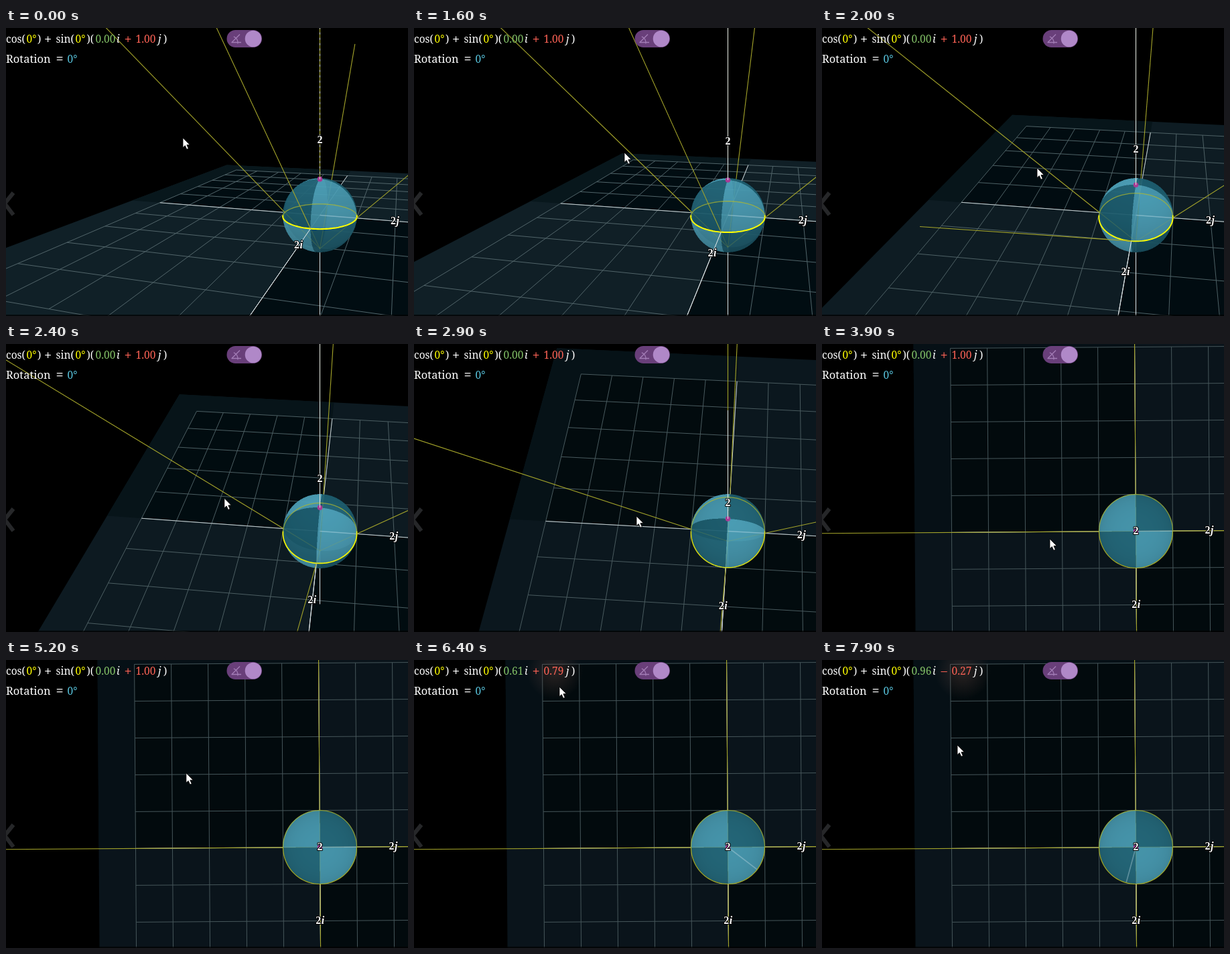
An HTML page with a canvas that plays this animation: 600x430 px, repeating every 8 s.

```html
<!DOCTYPE html>
<html lang="en">
<head>
<meta charset="utf-8">
<title>Rotation sphere</title>
<style>
html, body { margin: 0; width: 600px; height: 430px; overflow: hidden; background: #000; }
canvas { display: block; }
</style>
</head>
<body>
<canvas id="stage" width="600" height="430"></canvas>
<script>
const ctx = document.getElementById('stage').getContext('2d');
const CX = 468.5, CY = 279.5, DIST = 8.8, FOCAL = 55 * DIST;
const SERIF = '"Noto Serif", "Liberation Serif", serif';
const LABEL = '"Liberation Serif", "Times New Roman", serif';
const YELLOW = '#ffff00', RAY = '#a4a42a', AXIS = '#e2e6e7';

// time, cursor x, cursor y, elevation, azimuth, j component
const KEYS = [
  [0, 264, 164, 19.6, 13.15, 1],
  [500, 264, 164, 19.6, 13.15, 1],
  [800, 302, 176, 19.6, 13.15, 1],
  [1300, 302, 176, 19.6, 13.15, 1],
  [1600, 314, 186, 24.6, 9.6, 1],
  [2000, 321, 209, 40.25, 6.5, 1],
  [2900, 332, 257, 72.5, 3.3, 1],
  [3600, 338, 282, 90, 0, 1],
  [3900, 340, 291, 90, -0.4, 1],
  [4800, 340, 291, 90, -0.4, 1],
  [5700, 180, 16, 90, -0.4, 1],
  [5800, 204, 29, 90, -0.4, 1],
  [6100, 204, 29, 90, -0.4, 1],
  [6400, 217, 40, 90, -0.4, 0.79],
  [7900, 202, 127, 90, -0.4, -0.27],
  [8000, 202, 127, 90, -0.4, -0.27]
];

const mix = (a, b, k) => a + (b - a) * k;
const blend = (a, b, k) => `rgb(${a.map((v, n) => mix(v, b[n], k))})`;

function pose(t) {
  const n = KEYS.findIndex(key => key[0] > t);
  const a = KEYS[n - 1], b = KEYS[n];
  return a.map((v, c) => mix(v, b[c], (t - a[0]) / (b[0] - a[0])));
}

let right, up, toward;

function aim(el, az) {
  const rad = Math.PI / 180;
  const se = Math.sin(el * rad), ce = Math.cos(el * rad);
  const sa = Math.sin(az * rad), ca = Math.cos(az * rad);
  right = [-sa, ca, 0];
  up = [-se * ca, -se * sa, ce];
  toward = [ce * ca, ce * sa, se];
}

const dot = (a, b) => a[0] * b[0] + a[1] * b[1] + a[2] * b[2];

function project(p) {
  const k = FOCAL / (DIST - dot(p, toward));
  return [CX + dot(p, right) * k, CY - dot(p, up) * k];
}

function trace(points) {
  ctx.beginPath();
  points.forEach(p => ctx.lineTo(...p));
}

function line(points, color, width = 1) {
  trace(points.map(project));
  ctx.strokeStyle = color;
  ctx.lineWidth = width;
  ctx.stroke();
}

function quad(a, b, color) {
  trace([[a, a, 0], [a, b, 0], [b, b, 0], [b, a, 0]].map(project));
  ctx.fillStyle = color;
  ctx.fill();
}

function floor(k) {
  const edge = blend([8, 23, 28], [6, 16, 22], k);
  const dark = blend([1, 13, 18], [2, 10, 13], k);
  quad(-6, 6, blend([16, 32, 39], [10, 20, 27], k));
  for (const s of [-1, 1]) {
    quad(0, 6 * s, edge);
    quad(0, 5 * s, dark);
  }
  const grid = blend([82, 101, 106], [70, 86, 90], k);
  for (let n = -5; n <= 5; n++) {
    line([[n, -5, 0], [n, 5, 0]], grid);
    line([[-5, n, 0], [5, n, 0]], grid);
  }
  line([[0, -5, 0], [0, 5, 0]], '#c4cccf');
  line([[-5, 0, 0], [5, 0, 0]], '#c4cccf');
}

const BALL = 240;
const ball = document.createElement('canvas');
ball.width = ball.height = BALL;
const ballCtx = ball.getContext('2d');
const pixels = ballCtx.createImageData(BALL, BALL);

// Ray-cast a translucent sphere whose octants alternate light and dark.
function sphere() {
  const data = pixels.data;
  data.fill(0);
  for (let n = 0; n < BALL * BALL; n++) {
    const x = (n % BALL + 0.5 - BALL / 2) / 2 / FOCAL;
    const y = (BALL / 2 - Math.floor(n / BALL) - 0.5) / 2 / FOCAL;
    const q = x * x + y * y + 1;
    const disc = DIST * DIST - q * (DIST * DIST - 1);
    if (disc < 0) continue;
    const hit = side => {
      const t = (DIST + side * Math.sqrt(disc)) / q;
      return [0, 1, 2].map(c => x * t * right[c] + y * t * up[c] + (DIST - t) * toward[c]);
    };
    const front = hit(-1), back = hit(1);
    const lit = p => p[0] * p[1] * p[2] > 0 ? 1 : 0;
    const w = 0.27 + 0.4 * lit(front) + 0.06 * lit(back);
    const shade = 0.88 + 0.14 * front[2];
    data[n * 4] = (2 + 104 * w) * shade;
    data[n * 4 + 1] = (56 + 145 * w) * shade;
    data[n * 4 + 2] = (70 + 158 * w) * shade;
    data[n * 4 + 3] = 240;
  }
  ballCtx.putImageData(pixels, 0, 0);
  ctx.drawImage(ball, CX - BALL / 4, CY - BALL / 4, BALL / 2, BALL / 2);
}

function halfEquator(start, color, width) {
  const arc = [];
  for (let n = 0; n <= 60; n++) {
    const a = start + n / 60 * Math.PI;
    arc.push([Math.cos(a), Math.sin(a), 0]);
  }
  line(arc, color, width);
}

// Point on the line from the south pole through an equator point.
const along = (i, j, s) => [i * s, j * s, s - 1];
const ray = (i, j, from, to, color) => line([along(i, j, from), along(i, j, to)], color, 1.1);

function text(s, x, y, color = '#fff', style = '', size = 15.5) {
  ctx.font = `${style} ${size}px ${SERIF}`;
  ctx.fillStyle = color;
  ctx.fillText(s, x, y);
}

function label(p, letter = '') {
  const [x, y] = project(p);
  const parts = [['2', 'bold'], [letter, 'italic bold']];
  let left = x - (letter ? 7 : 4);
  for (const [s, style] of parts) {
    ctx.font = `${style} 16px ${LABEL}`;
    ctx.strokeStyle = '#000';
    ctx.lineWidth = 2;
    ctx.lineJoin = 'round';
    ctx.strokeText(s, left, y + 4.5);
    ctx.fillStyle = '#fff';
    ctx.fillText(s, left, y + 4.5);
    left += ctx.measureText(s).width + 0.5;
  }
}

function scene(el, az, i, j) {
  aim(el, az);
  const k = (el - 19.6) / 70.4, flat = up[2];
  floor(k);
  line([[0, 0, -5], [0, 0, -1]], AXIS);
  ray(-1, 0, 1, 6, RAY);
  sphere();

  for (const [a, b] of [[1, 0], [-1, 0], [0, 1], [0, -1]]) ray(a, b, 0, 1, 'rgba(170,180,60,.2)');
  line([[0, 0, 0], [i, j, 0]], 'rgba(190,215,225,.4)', 1.6);
  const turn = az * Math.PI / 180;
  halfEquator(turn + Math.PI / 2, 'rgba(180,185,40,.7)', 1.3);
  halfEquator(turn - Math.PI / 2, blend([255, 255, 0], [165, 165, 30], k * k * k), 1.2 + 0.9 * flat);

  line([[1, 0, 0], [5, 0, 0]], AXIS);
  ctx.fillStyle = '#a83a96';
  ctx.beginPath();
  ctx.arc(...project([0, 0, 1]), 3.8, 0, 7);
  ctx.fill();
  line([[0, 0, 1], [0, 0, 7]], RAY, 1.1);
  if (el < 20) ctx.setLineDash([3, 5]);
  line([[0, 0, 1], [0, 0, 5]], AXIS);
  ctx.setLineDash([]);
  for (const [a, b] of [[1, 0], [0, 1], [0, -1]]) ray(a, b, 1, 6, RAY);

  label([0, 0, 2]);
  label([2, 0, 0], 'i');
  label([0, 2, 0], 'j');
}

function formula(i, j) {
  text('cos(', 0, 22);
  text('0°', 30.5, 22, YELLOW);
  text(')', 47, 22);
  text('+', 57, 23.5, '#fff', '', 20);
  text('sin(', 74.5, 22);
  text('0°', 103.5, 22, YELLOW);
  text(')(', 120.5, 22);
  text(i.toFixed(2), 133.5, 22, '#83c167');
  text('i', 165, 22, '#fff', 'italic');
  text(j < 0 ? '−' : '+', 176.5, 23.5, '#fc6255', '', 20);
  text(Math.abs(j).toFixed(2), 193.5, 22, '#fc6255');
  text('j', 227, 22, '#fff', 'italic');
  text(')', 235, 22);
  text('Rotation', 0, 51.5, '#fff', '', 16.5);
  text('=', 74.5, 53, '#fff', '', 20);
  text('0°', 91.5, 51.5, '#58c4dd');
}

function toggle() {
  ctx.fillStyle = '#693f7a';
  ctx.beginPath();
  ctx.roundRect(329.5, 3, 52.5, 26, 13);
  ctx.fill();
  ctx.fillStyle = '#b088c8';
  ctx.beginPath();
  ctx.arc(369, 16, 12.3, 0, 7);
  ctx.fill();
  ctx.strokeStyle = '#a37db6';
  ctx.lineWidth = 1.3;
  trace([[349, 9.5], [337, 21.5], [351, 21.5]]);
  ctx.stroke();
  ctx.beginPath();
  ctx.arc(337, 21.5, 9, -1.25, 0.2);
  ctx.stroke();
}

function chevron() {
  trace([[11, 246], [-2, 262], [11, 279]]);
  ctx.strokeStyle = '#262729';
  ctx.lineWidth = 6;
  ctx.lineJoin = 'miter';
  ctx.stroke();
}

function glow() {
  const g = ctx.createRadialGradient(210, 17, 2, 210, 17, 42);
  g.addColorStop(0, 'rgba(110,78,72,.35)');
  g.addColorStop(1, 'rgba(110,78,72,0)');
  ctx.fillStyle = g;
  ctx.fillRect(165, 0, 90, 62);
}

function cursor(x, y) {
  const shape = [[0, 0], [0, 14.5], [3.3, 11.6], [5.8, 17.2], [8.3, 16], [5.9, 10.6], [10.3, 10.4]];
  trace(shape.map(([a, b]) => [x + a, y + b]));
  ctx.closePath();
  ctx.fillStyle = '#fff';
  ctx.strokeStyle = '#000';
  ctx.lineWidth = 0.8;
  ctx.fill();
  ctx.stroke();
}

function draw(t) {
  const [, x, y, el, az, j] = pose(t);
  const i = Math.sqrt(Math.max(0, 1 - j * j));
  ctx.fillStyle = '#000';
  ctx.fillRect(0, 0, 600, 430);
  scene(el, az, i, j);
  if (t >= 5600) glow();
  formula(i, j);
  toggle();
  chevron();
  ctx.fillStyle = 'rgba(0,0,0,.7)';
  ctx.fillRect(0, 428, 600, 2);
  cursor(x, y);
}

const begin = performance.now();
let shown = -1;
function tick() {
  const t = Math.floor((performance.now() - begin) % 8000 / 100) * 100;
  if (t !== shown) draw(shown = t);
  requestAnimationFrame(tick);
}
tick();
</script>
</body>
</html>
```
